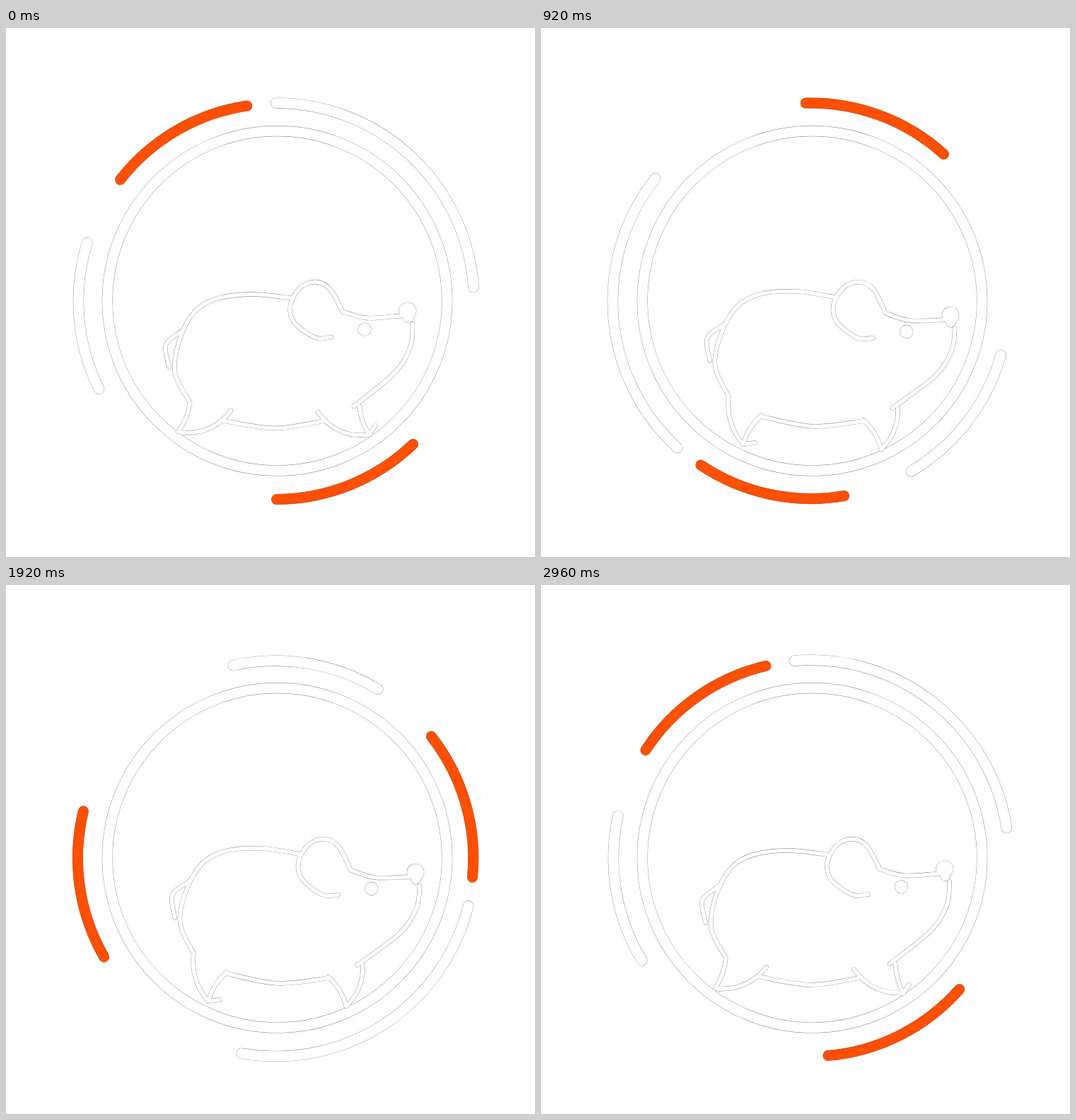
Write an HTML page with a canvas that moves like this. It is 748 by 748 pixels and loops after 3 s.

```html
<!DOCTYPE html>
<html lang="en">
<head>
<meta charset="utf-8">
<title>Wheel loader</title>
<style>
html, body { margin: 0; width: 100%; height: 100%; overflow: hidden; background: #fff; }
canvas { display: block; }
</style>
</head>
<body>
<canvas id="stage" width="748" height="748"></canvas>
<script>
const ctx = document.getElementById('stage').getContext('2d');
const STEP = 40, FRAMES = 75, TURN = 9.665, GALLOP = 5;
const RAD = Math.PI / 180;
const ORANGE = '#ff4f00', WHITE = '#fff', EDGE = '#777';

const mix = (a, b, t) => a + (b - a) * t;
const mixPoint = (p, q, t) => [mix(p[0], q[0], t), mix(p[1], q[1], t)];

// smooth curve through key points
function spline(path, ...pts) {
  path.moveTo(...pts[0]);
  for (let i = 0; i < pts.length - 1; i++) {
    const [a, b, c, d] = [pts[i - 1] ?? pts[i], pts[i], pts[i + 1], pts[i + 2] ?? pts[i + 1]];
    path.bezierCurveTo(
      b[0] + (c[0] - a[0]) / 6, b[1] + (c[1] - a[1]) / 6,
      c[0] - (d[0] - b[0]) / 6, c[1] - (d[1] - b[1]) / 6, ...c);
  }
}

// arc from a to b, bulging sideways in proportion to its length
function bow(path, a, b, bend) {
  const dx = b[0] - a[0], dy = b[1] - a[1];
  path.moveTo(...a);
  path.quadraticCurveTo(a[0] + dx / 2 + dy * bend, a[1] + dy / 2 - dx * bend, ...b);
}

function line(path, [x, y], dx, dy) {
  path.moveTo(x, y);
  path.lineTo(x + dx, y + dy);
}

function dot(path, x, y, r) {
  path.moveTo(x + r, y);
  path.arc(x, y, r, 0, 2 * Math.PI);
}

const body = new Path2D();
spline(body, [404, 382], [348, 376.5], [297, 383], [266, 402], [245, 442], [239, 488], [260, 529]); // back
spline(body, [249, 428], [226, 448], [231, 480]); // tail
spline(body, [460, 437], [438, 438], [408, 417], [402, 393], [415, 368], [437, 359], [458, 369], [476, 401]); // ear
spline(body, [476, 401], [510, 410], [557, 407]); // snout
spline(body, [575, 418], [572, 450], [550, 487], [492, 535]); // chin
spline(body, [306, 555], [380, 566], [452, 555]); // belly

const face = new Path2D();
dot(face, 568, 400, 9.2);
dot(face, 569, 410, 4);
dot(face, 507, 426, 6.4);

// a leg runs from hip to paw and back up to the belly
function leg(path, side, hip, paw, tip, t) {
  bow(path, hip, paw, side * mix(0.15, -0.22, t));
  bow(path, tip, paw, side * mix(0.3, -0.16, t));
}

// m: 0 stretched, 1 gathered
function pigPath(m) {
  const local = new Path2D(body), t = m * m;
  const hindPaw = mixPoint([243, 571], [284, 596], t);
  const frontPaw = mixPoint([514, 575], [479, 594], t);
  leg(local, 1, [260, 529], hindPaw, mixPoint([318, 541], [308, 554], t), t);
  leg(local, -1, [500, 535], frontPaw, mixPoint([441, 543], [452, 554], t), t);
  line(local, hindPaw, 9 + 7 * t, 2 - 5 * t);
  line(local, frontPaw, 8 * (1 - t), -13 * (1 - t));
  local.addPath(face);
  return local;
}

function outlined(path, width, colour) {
  for (const [w, c] of [[width + 0.7, EDGE], [width, colour]]) {
    ctx.lineWidth = w;
    ctx.strokeStyle = c;
    ctx.stroke(path);
  }
}

function ring(x, y, r, width, colour, from = 0, sweep = 360) {
  const path = new Path2D();
  path.arc(x, y, r, from * RAD, (from + sweep) * RAD);
  outlined(path, width, colour);
}

function drawPig(frame) {
  const swing = 0.5 - 0.5 * Math.cos(2 * Math.PI * frame / GALLOP);
  const m = Math.min(1, Math.max(0, 1.35 * swing - 0.22));
  ctx.save();
  ctx.translate(400 + 9.3 * m, 440 - 1.7 * m);
  ctx.rotate(2.7 * RAD * m);
  ctx.translate(-400, -440);
  outlined(pigPath(m), 5.6, WHITE);
  ctx.fillStyle = WHITE;
  ctx.fill(face);
  ctx.restore();
}

function draw(now) {
  const frame = Math.floor(now / STEP) % FRAMES;
  ctx.fillStyle = WHITE;
  ctx.fillRect(0, 0, 748, 748);
  ctx.lineCap = ctx.lineJoin = 'round';

  ring(383.5, 385.8, 240.2, 14.4, WHITE);
  [270, 46.2, 153.6, 218].forEach((from, i) => ring(
    381.6, 386.3, i < 2 ? 280.2 : 279.2, 14.5,
    i % 2 ? ORANGE : WHITE, from + frame * TURN, i ? 43.6 : 86));

  drawPig(frame);
}

let start;
function tick(now) {
  start ??= now;
  draw(Math.max(0, now - start));
  requestAnimationFrame(tick);
}
requestAnimationFrame(tick);
</script>
</body>
</html>
```
